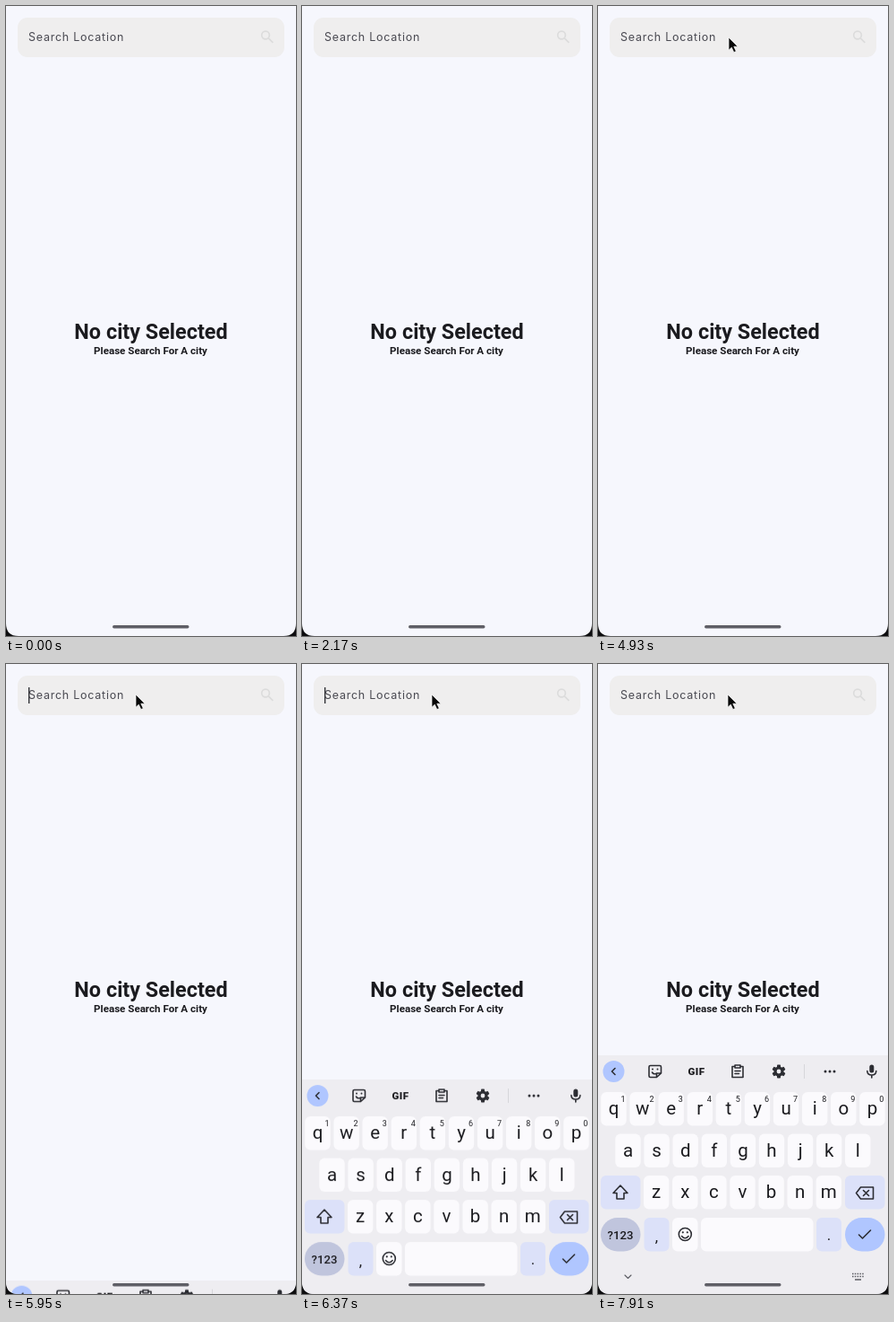
An HTML page that plays this animation: 324 px wide and 702 px high, repeating every 8 s.

```html
<!DOCTYPE html>
<html lang="en">
<head>
<meta charset="utf-8">
<style>
html, body { margin: 0; width: 100%; height: 100%; overflow: hidden; background: #0c0c0e; }
svg { display: block; width: 324px; height: 702px; }
text { font-family: Roboto, sans-serif; fill: #1b1b1f; text-anchor: middle; }
.line { fill: none; stroke: #2c2d33; stroke-width: 1.6; stroke-linecap: round; stroke-linejoin: round; }
.thin { stroke: #5a5b62; stroke-width: 1.1; }
.dark { fill: #2c2d33; }
</style>
</head>
<body>
<svg viewBox="0 0 324 702">
  <defs><clipPath id="screen"><path d="M0 0H324V688Q324 702 310 702H14Q0 702 0 688Z"/></clipPath></defs>
  <g clip-path="url(#screen)">
    <rect width="324" height="702" fill="#f6f7fd"/>
    <rect x="13" y="13" width="298" height="44" rx="11" fill="#efeeee"/>
    <text x="25" y="39" style="font:12.5px Inter,sans-serif;letter-spacing:.75px;text-anchor:start;fill:#4a4a52">Search Location</text>
    <g fill="none" stroke="#dcdcdc" stroke-width="1.7"><circle cx="290" cy="32.5" r="4.3"/><path d="M293.3 35.8L298.3 40.8"/></g>
    <rect id="caret" x="25" y="26" width="1.4" height="18" fill="#333338"/>
    <text x="162" y="371" font-size="23.4" font-weight="700">No city Selected</text>
    <text x="161.5" y="388" font-size="11.6" font-weight="600">Please Search For A city</text>
    <g id="keyboard"></g>
    <rect x="119" y="690" width="85.5" height="3.4" rx="1.7" fill="#5f5f66"/>
    <path id="cursor" d="M0 0V14.2L3.3 11.2L5.8 16.6L8.3 15.4L5.8 10.2H10.2Z" fill="#080808" stroke="#fff" stroke-width=".7"/>
  </g>
</svg>
<script>
const LOOP = 8000;
const WHITE = '#fbfafd', LILAC = '#dce1f9', BLUE = '#b0c6ff', SLATE = '#c0c5dd';
const PITCH = 32.1;
const byId = id => document.getElementById(id);

const box = (x, y, w, fill, r = 6) =>
  `<rect x="${x}" y="${y}" width="${w}" height="37.5" rx="${r}" fill="${fill}"/>`;
const label = (x, y, size, str, extra = '') =>
  `<text x="${x}" y="${y}" font-size="${size}" ${extra}>${str}</text>`;
const line = (d, kind = '') => `<path class="line ${kind}" d="${d}"/>`;
const dot = (x, y, r) => `<circle class="dark" cx="${x}" cy="${y}" r="${r}"/>`;

function letters(row, x, y, numbered) {
  return [...row].map((c, i) => {
    const cx = x + i * PITCH;
    return box(cx - 14.2, y, 28.4, WHITE) + label(cx, y + 25, 20.5, c) +
      (numbered ? label(cx + 10.5, y + 10.5, 9, (i + 1) % 10) : '');
  }).join('');
}

function gear(x, y) {
  const teeth = Array.from({ length: 6 }, (_, i) =>
    `<rect class="dark" x="${x - 2}" y="${y - 7.5}" width="4" height="4" rx=".8" transform="rotate(${i * 60} ${x} ${y})"/>`);
  return teeth.join('') +
    `<circle cx="${x}" cy="${y}" r="4" fill="none" stroke="#2c2d33" stroke-width="3.2"/>`;
}

const toolbar =
  `<circle cx="17.5" cy="454" r="12" fill="${BLUE}"/>` + line('M19 450.5L15.5 454L19 457.5') +
  line('M58.5 447.5H69Q70.5 447.5 70.5 449V456L65.5 460.5H58.5Q57 460.5 57 459V449Q57 447.5 58.5 447.5ZM65.5 460V456H70M60.5 455Q62 457.5 64.5 456.5') +
  dot(61, 451.5, 1) + dot(66.5, 451.5, 1) +
  label(110, 458, 11.5, 'GIF', 'font-weight="900" letter-spacing=".5"') +
  line('M152.5 448.5H150V460.5H162V448.5H159.5M153 447H159V450H153ZM153 453.5H159M153 456.5H157.5') +
  gear(202, 454) +
  '<path d="M230.5 446V462" stroke="#d6d6da"/>' +
  [254, 259, 264].map(x => dot(x, 454, 1.5)).join('') +
  '<rect class="dark" x="303.3" y="446.5" width="5" height="9" rx="2.5"/>' +
  line('M300.8 453.5Q301 458 305.8 458T310.8 453.5M305.8 458V461');

const thirdRow =
  box(3, 570, 44.5, LILAC) + line('M25 581L33 589.5H29V596H21V589.5H17Z') +
  letters('zxcvbnm', 65.2, 570) +
  box(276, 570, 44.5, LILAC) +
  line('M293.5 583H307.5V596H293.5L288.5 589.5ZM296.5 586.5L302.5 592.5M302.5 586.5L296.5 592.5');

const bottomRow =
  box(3, 617, 44.5, SLATE, 18.7) + label(25, 640.5, 13.2, '?123', 'font-weight="500"') +
  box(51.5, 617, 28, LILAC) + label(65.5, 644, 17, ',') +
  box(83, 617, 28.5, WHITE) +
  '<circle class="line" cx="97.3" cy="635.5" r="7"/>' + line('M93.5 637.5Q97.3 642 101.1 637.5') +
  dot(94.8, 633.3, 1.1) + dot(99.8, 633.3, 1.1) +
  box(115, 617, 125.5, WHITE) +
  box(244, 617, 28, LILAC) + label(258, 642, 17, '.') +
  box(276, 617, 44.5, BLUE, 18.7) + line('M291.5 636L295.5 640L304.5 631');

const footer =
  line('M30 681L33.5 684.5L37 681', 'thin') +
  [679.5, 682.5].map(y =>
    `<path d="M284 ${y}H297" stroke="#5a5b62" stroke-width="1.5" stroke-dasharray="1.5 1.3"/>`).join('') +
  '<path d="M287 686H294" stroke="#5a5b62" stroke-width="1.5"/>';

byId('keyboard').innerHTML =
  '<rect y="436" width="324" height="266" fill="#eeedf1"/>' + toolbar +
  letters('qwertyuiop', 17.5, 477, true) + letters('asdfghjkl', 33.5, 523.5) +
  thirdRow + bottomRow + footer;

// Each step: time in ms, value, easing towards the next step
function play(id, property, steps) {
  const frames = steps.map(([time, value, easing = 'linear']) =>
    ({ offset: time / LOOP, [property]: value, easing }));
  byId(id).animate(frames, { duration: LOOP, iterations: Infinity });
}
const at = (x, y) => `translate(${x}px, ${y}px)`;

play('cursor', 'transform', [
  [0, at(330, 30)], [2900, at(330, 30)],
  [3290, at(217, 34), 'ease-out'], [3750, at(146, 35)],
  [5000, at(146, 35)], [5300, at(145, 34)], [LOOP, at(145, 34)]
]);
play('keyboard', 'transform', [
  [0, at(0, 266)], [5891, at(0, 266), 'cubic-bezier(.2, 0, 0, 1)'],
  [6788, at(0, 0)], [LOOP, at(0, 0)]
]);
play('caret', 'opacity', [
  [0, 0, 'step-end'], [5900, 1, 'step-end'], [6400, 0, 'step-end'], [LOOP, 0]
]);
</script>
</body>
</html>
```
